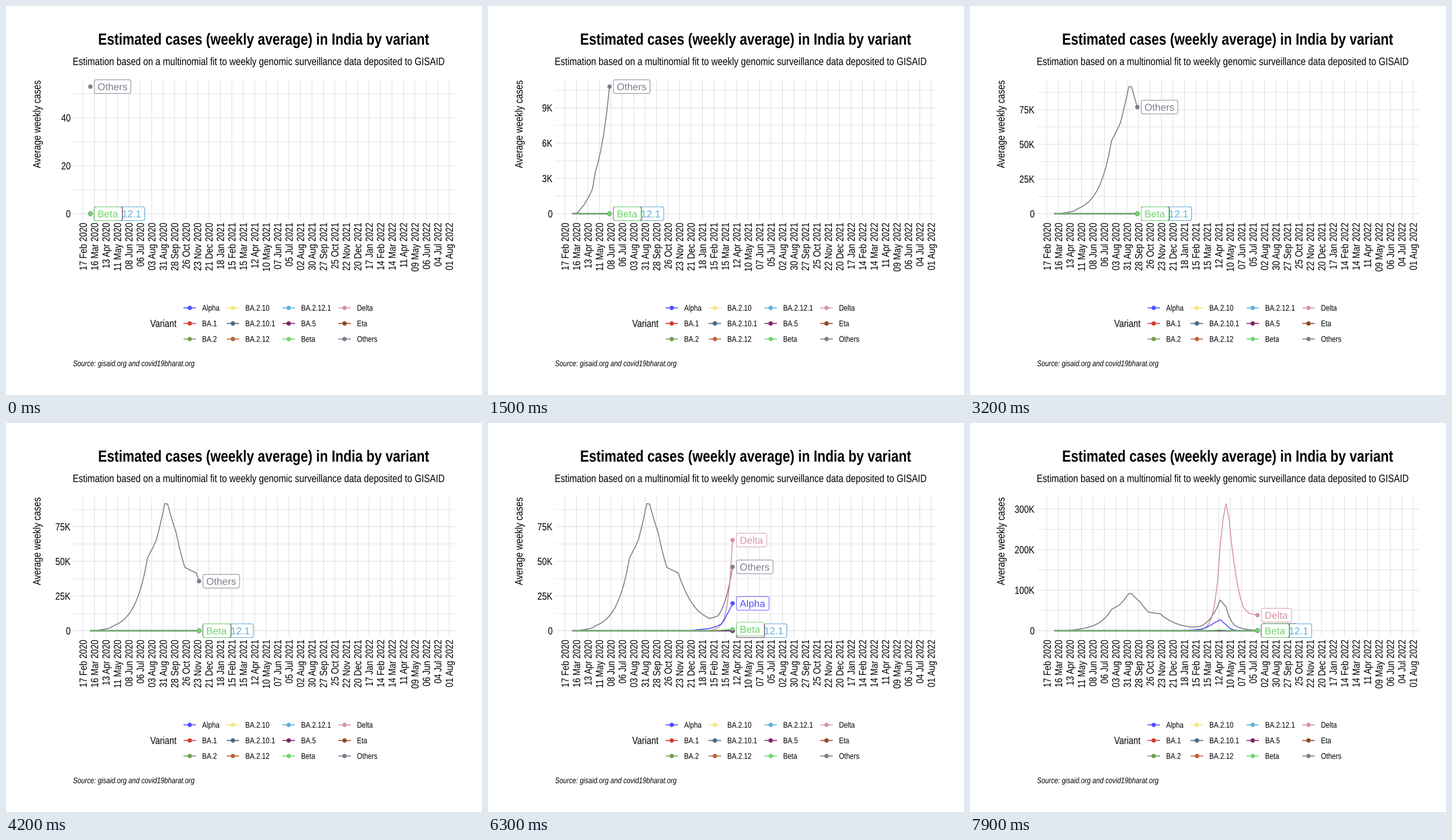
Recreate the animation shown at these times as a matplotlib script. Size 827x677 px, loop 8 s.

```python
import numpy as np
import matplotlib.pyplot as plt
from matplotlib.animation import FuncAnimation
from matplotlib.collections import LineCollection
from matplotlib.patches import Circle, FancyBboxPatch, PathPatch
from matplotlib.textpath import TextPath
from matplotlib.transforms import Affine2D

W, H, DPI = 827, 677, 64
PX = 72 / DPI                      # points per pixel
LEFT, RIGHT, TOP, BOTTOM = 116.5, 780, 129, 372.7
BASE, SPAN = 361.5, 221.2          # zero line and height of the running maximum
X0, WEEK = 146.6, 4.97
TICK0, TICK_STEP = 133.8, 19.88
FRAMES_PER_WEEK = 1.117
NARROW = 0.82                      # proportion of the condensed sans face
LINE = 1.67 * PX

COLORS = {
    "Alpha": "#5050FF", "BA.1": "#CE3D32", "BA.2": "#749B58",
    "BA.2.10": "#F0E685", "BA.2.10.1": "#466983", "BA.2.12": "#BA6338",
    "BA.2.12.1": "#5DB1DD", "BA.5": "#802268", "Beta": "#6BD76B",
    "Delta": "#D595A7", "Eta": "#924822", "Others": "#837B8D",
}
# Drawing order, back to front
STACK = ["Others", "Delta", "Alpha", "Eta"]
STACK += [n for n in COLORS if n.startswith("BA")] + ["Beta"]

weeks = np.arange(74)
key_frames = np.round(weeks * FRAMES_PER_WEEK)


def growth(*keys):
    """Exponential growth and decay between (week, thousands) turning points."""
    at, value = np.transpose(keys)
    return 1000 * np.exp(np.interp(weeks, at, np.log(value), left=-np.inf))


series = {name: np.zeros(len(weeks)) for name in STACK}
series["Others"] = growth(
    (0, .053), (1, .035), (3, .45), (5, 1.14), (7, 2.09), (8, 3.48),
    (13, 10.8), (20, 52.7), (23, 65), (26, 91.6), (27, 91.3), (30, 70.5),
    (33, 45.7), (37, 41.6), (44, 14.2), (48, 8.7), (51, 10.8), (56, 46),
    (58, 76), (60, 59), (63, 13.5), (71, 1))
series["Alpha"] = growth((39, .1), (44, .8), (48, 1.7), (52, 4.8), (54, 11.6),
                         (56, 19.7), (58, 27.5), (60, 15), (68, .05))
series["Delta"] = growth((46, .08), (56, 65.3), (58, 213), (59, 277), (60, 313.5),
                         (61, 279), (63, 158), (66, 58.5), (68, 43), (72, 37))
series["Beta"] = growth((40, .05), (52, .45), (58, 1.9), (61, .7), (66, .01))
series["Eta"] = 500 * np.exp(-((weeks - 57) / 3) ** 2)

fig = plt.figure(figsize=(W / DPI, H / DPI), dpi=DPI, facecolor="white")
ax = fig.add_axes([0, 0, 1, 1])
ax.set(xlim=(0, W), ylim=(H, 0))
ax.axis("off")


def glyphs(s, size, narrow=NARROW, angle=0, ha="left", **font):
    path = TextPath((0, 0), s, size=size,
                    prop={"family": "Liberation Sans", **font})
    box = path.get_extents()
    shift = {"left": 0, "center": -(box.x0 + box.x1) / 2, "right": -box.x1}[ha]
    place = Affine2D().translate(shift, 0).scale(narrow, -1).rotate_deg(-angle)
    return place.transform_path(path)


def move(patch, x, y):
    patch.set_transform(Affine2D().translate(x, y) + ax.transData)


def draw_path(path, x=0, y=0, color="black", z=2):
    patch = PathPatch(path, fc=color, lw=0, zorder=z)
    move(patch, x, y)
    return ax.add_patch(patch)


def text(s, x, y, size, **style):
    return draw_path(glyphs(s, size, **style), x, y)


def stroke(x, y, color, z=2):
    line, = ax.plot(x, y, color=color, lw=LINE, snap=False,
                    solid_capstyle="butt", zorder=z)
    return line


def disc(x, y, color, z=3):
    return ax.add_patch(Circle((x, y), 3.8, fc=color, lw=0, zorder=z))


def grid(width):
    lines = LineCollection([], colors="#cccccc", linewidths=width * PX, zorder=1)
    lines.set_snap(False)
    return ax.add_collection(lines)


def nice_step(lo, hi, m=5):
    """Tick step by the extended Wilkinson search."""
    steps = (1, 5, 2, 2.5, 4, 3)
    size, best, found = hi - lo, -9, None
    power = int(np.floor(np.log10(size)))
    for i, q in enumerate(steps):
        for step in (q * 10.0 ** z for z in range(power - 2, power + 2)):
            for k in range(2, 13):
                first = int(np.floor(hi / step)) - (k - 1)
                for start in range(first, int(np.ceil(lo / step)) + 1):
                    a, b = start * step, (start + k - 1) * step
                    simple = (a <= 0 <= b) - i / (len(steps) - 1)
                    cover = 1 - .5 * ((hi - b) ** 2 + (lo - a) ** 2) / (.1 * size) ** 2
                    ratio = (max(b, hi) - min(a, lo)) / (step * (m - 1))
                    dense = 2 - max(ratio, 1 / ratio)
                    score = .25 * simple + .2 * cover + .5 * dense
                    if score > best:
                        best, found = score, step
    return found


def multiples(step, hi):
    return np.arange(0, int(hi / step) + 1) * step


def tick_labels(values):
    whole = all(abs(v / 1000 - round(v / 1000)) < 1e-6 for v in values if v >= 1000)
    digits = 0 if whole else 1
    return [f"{v / 1000:.{digits}f}K" if v >= 1000 else f"{v:g}" for v in values]


# Static text
text("Estimated cases (weekly average) in India by variant",
     (LEFT + RIGHT) / 2, 67.3, 28.17, ha="center", weight="bold")
text("Estimation based on a multinomial fit to weekly genomic surveillance "
     "data deposited to GISAID", LEFT - .6, 102.8, 18.78)
text("Average weekly cases", 60, TOP + .8, 18.78, angle=90, ha="right")
text("Source: gisaid.org and covid19bharat.org", LEFT, 626.8, 14.08, style="italic")

# Date axis
first_day = np.datetime64("2020-02-17")
columns = []
for i in range(33):
    x = TICK0 + i * TICK_STEP
    day = (first_day + np.timedelta64(28 * i, "D")).astype(object)
    text(day.strftime("%d %b %Y"), x + 6.4, 377.8, 18, angle=90, ha="right")
    columns.append([(x, TOP), (x, BOTTOM)])
grid(.67).set_segments(columns)

# Legend
text("Variant", 250.5, 558.6, 18)
for i, (name, color) in enumerate(COLORS.items()):
    x, y = (319, 394, 491, 588)[i // 3] + .2, 525.4 + 27.1 * (i % 3)
    stroke([x - 10.8, x + 10.8], [y, y], color)
    disc(x, y, color)
    text(name, x + 21.6, y + 4.9, 14.4)

# Moving parts
major, minor = grid(.67), grid(.5)
ticks = [draw_path(glyphs("0", 18, ha="right")) for _ in range(12)]
marks = {}
for i, name in enumerate(STACK):
    color, depth = COLORS[name], i / 100
    word = Affine2D().translate(5.6, 6.3).transform_path(glyphs(name, 17.3, narrow=1))
    box = ax.add_patch(FancyBboxPatch(
        (0, -11.9), word.get_extents().x1 + 6.6, 23.8,
        boxstyle="round,pad=0,rounding_size=3.4",
        fc="white", ec=color, lw=.95 * PX, zorder=6 + depth))
    label = draw_path(word, color=color, z=6.005 + depth)
    marks[name] = (stroke([], [], color, 4 + depth),
                   disc(0, 0, color, 5 + depth), (box, label))


def update(frame):
    now = np.interp(frame, key_frames, weeks)
    seen = int(now + 1e-9) + 1
    x = X0 + WEEK * np.append(weeks[:seen], now)
    values = {n: np.append(v[:seen], np.interp(now, weeks, v))
              for n, v in series.items()}
    peak = max(v.max() for v in values.values())

    def to_y(v):
        return BASE - SPAN * v / peak

    def rows(at):
        return [[(LEFT, to_y(v)), (RIGHT, to_y(v))] for v in at]

    for name, (line, dot, tag) in marks.items():
        y = to_y(values[name])
        line.set_data(x, y)
        dot.center = x[-1], y[-1]
        for part in tag:
            move(part, x[-1] + 6.8, y[-1])

    top = 1.05 * peak
    step = nice_step(-.05 * peak, top)
    at = multiples(step, top)
    major.set_segments(rows(at))
    minor.set_segments(rows(multiples(step / 2, top)[1::2]))
    names = tick_labels(at)
    for i, tick in enumerate(ticks):
        tick.set_visible(i < len(at))
        if i < len(at):
            tick.set_path(glyphs(names[i], 18, ha="right"))
            move(tick, 111.8, to_y(at[i]) + 6.4)
    return []


anim = FuncAnimation(fig, update, frames=80, interval=100, repeat=True, blit=False)
plt.show()
```
